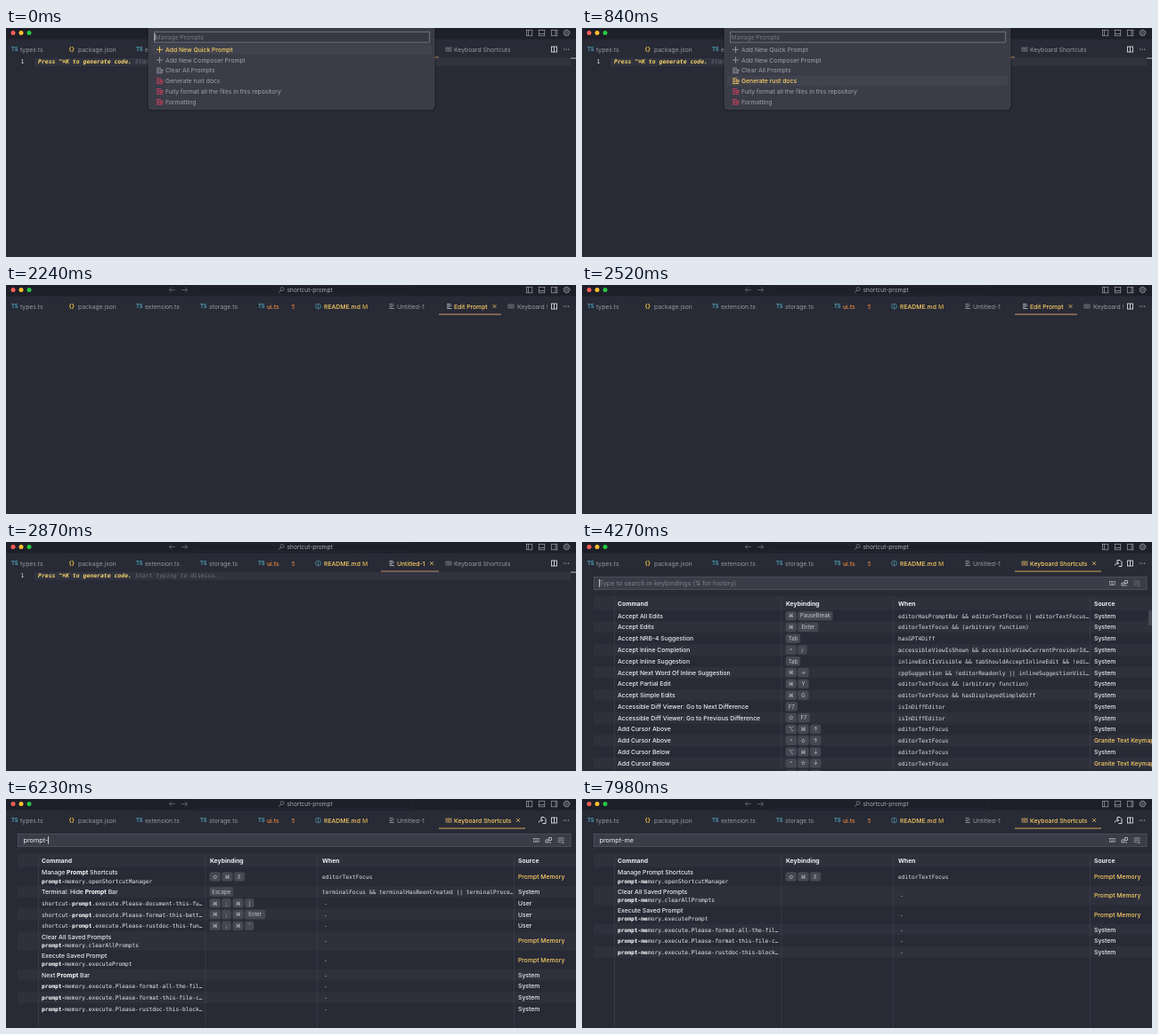
An HTML page that plays this animation: 640x258 px, repeating every 8000 ms.

```html
<!DOCTYPE html>
<html lang="en">
<head>
<meta charset="utf-8">
<title>Prompt shortcuts</title>
<style>
html, body { margin: 0; width: 100%; height: 100%; overflow: hidden; background: #282a36; }
svg { display: block; width: 640px; height: 258px; }
text { font: 6.8px Inter, "DejaVu Sans", sans-serif; white-space: pre; }
.mono { font: 6.25px "DejaVu Sans Mono", monospace; }
.code { font: italic 6.46px "DejaVu Sans Mono", monospace; }
.input { font-size: 7.3px; }
.title { font-size: 6.6px; }
.badge { font-size: 5.8px; }
.key { font-size: 6px; text-anchor: middle; }
.mid { font-weight: 500; }
.bold { font-weight: 700; }
</style>
</head>
<body>
<svg id="stage" viewBox="0 0 640 258"></svg>
<script>
const LOOP = 8000;
const BG = '#282a36', DARK = '#1d1f29', GREY = '#9799a3', DIM = '#767882', ICON = '#a0a2ab',
  WHITE = '#eeeef2', YELLOW = '#fbcf65', ORANGE = '#ee8a3c', TEAL = '#4fa3b8', RED = '#d8405f';
const stage = document.getElementById('stage');

// Drawing helpers; text is centred vertically on y.
const esc = s => s.replace(/&/g, '&amp;').replace(/</g, '&lt;');
const text = (s, x, y, fill = GREY, cls = '') =>
  `<text x="${x}" y="${y + 2.5}" fill="${fill}" class="${cls}">${esc(s)}</text>`;
const rect = (x, y, w, h, fill, more = '') =>
  `<rect x="${x}" y="${y}" width="${w}" height="${h}" fill="${fill}" ${more}/>`;
const path = (d, color = GREY, w = .7) =>
  `<path d="${d}" fill="none" stroke="${color}" stroke-width="${w}"/>`;
const circle = (x, y, r, fill, more = '') =>
  `<circle cx="${x}" cy="${y}" r="${r}" fill="${fill}" ${more}/>`;

// Text whose *marked* parts are bold and bright.
const marked = (s, x, y, cls) => `<text x="${x}" y="${y + 2.5}" fill="${WHITE}" class="${cls}">` +
  s.split('*').map((p, i) => i % 2 ? `<tspan class="bold" fill="#fff">${p}</tspan>` : p).join('') + '</text>';

const lines = (x, y, c = GREY) =>
  path(`M${x} ${y - 2.6}h4M${x} ${y - .9}h5.5M${x} ${y + .8}h3.5M${x} ${y + 2.5}h5.5`, c, .8);
const cross = (x, y, c) => path(`M${x - 2} ${y - 2}l4 4m0-4l-4 4`, c);
const keyboard = (x, y, c = GREY) =>
  rect(x, y - 2, 6, 4, 'none', `stroke="${c}" stroke-width=".6"`) +
  path(`M${x + 1} ${y - .6}h4M${x + 1.5} ${y + .9}h3`, c, .6);
const panel = (x, d) =>
  rect(x - 3.2, 2.3, 6.5, 6.5, 'none', `stroke="${ICON}" stroke-width=".7"`) + path(d, ICON);
const tsTab = (x, name, fill) =>
  text('TS', x, 23.4, TEAL, 'badge bold') + text(name, x + 10, 24, fill, fill && 'mid');

function chrome() {
  return rect(0, 0, 640, 258, BG) + rect(0, 0, 640, 12.5, DARK) +
    circle(8, 5.5, 2.5, '#fe5f57') + circle(17, 5.5, 2.5, '#febc2e') + circle(26, 5.5, 2.5, '#28c840') +
    path('M190 5.5h-6.5M186 2.8l-2.7 2.7l2.7 2.7M197 5.5h6.5M201 2.8l2.7 2.7l-2.7 2.7', DIM) +
    rect(211, .5, 246, 10, 'none', 'rx="2" stroke="#292b36" stroke-width=".6"') +
    circle(310, 4.6, 2, 'none', `stroke="${GREY}" stroke-width=".6"`) + path('M308.5 6.2l-2.3 2.5') +
    text('shortcut-prompt', 315.5, 5, '#aaacb4', 'title') +
    panel(587.5, 'M586.5 2.3v6.5') + panel(601.5, 'M598.3 6.5h6.5') + panel(615.5, 'M617 2.3v6.5') +
    circle(629.5, 5.5, 3.4, 'none', `stroke="${ICON}" stroke-width=".9" stroke-dasharray="1.5 1.17"`) +
    circle(629.5, 5.5, 2.8, 'none', `stroke="${ICON}" stroke-width=".7"`) +
    circle(629.5, 5.5, 1, 'none', `stroke="${ICON}" stroke-width=".6"`);
}

function tabs(view) {
  const edit = view === 'edit', keys = view === 'keys', untitled = view === 'untitled';
  const kx = edit ? 564 : 494, kc = keys ? YELLOW : GREY;
  const [ux, uw] = untitled ? [421, 65] : edit ? [486, 70] : [486, 97];
  return tsTab(6, 'types.ts') + text('{}', 70.5, 23.6, '#e0b73f', 'bold') + text('package.json', 81, 24) +
    tsTab(146, 'extension.ts') + tsTab(218, 'storage.ts') + tsTab(283, 'ui.ts', ORANGE) +
    text('5', 320.5, 24, ORANGE) +
    circle(350.5, 24, 2.9, 'none', `stroke="${TEAL}" stroke-width=".7"`) + path('M350.5 22v.8m0 .8v2.4', TEAL, .8) +
    text('README.md', 357, 24, YELLOW, 'mid') + text('M', 400, 24, '#d6ad55', 'mid') +
    lines(430.5, 24, untitled ? '#c4c5cc' : GREY) +
    text('Untitled-1', 439, 24, untitled ? YELLOW : GREY, untitled ? 'mid' : '') +
    (untitled ? cross(478, 24, YELLOW) : '') +
    (edit ? lines(495, 24, '#c4c5cc') + text('Edit Prompt', 503, 24, YELLOW, 'mid') + cross(548.5, 24, YELLOW) : '') +
    keyboard(kx, 24, kc) + text('Keyboard Shortcuts', kx + (edit ? 10 : 9), 24, kc, keys ? 'mid' : '') +
    (keys ? cross(575, 24, YELLOW) : '') +
    rect(608, 13, 32, 20, BG) +
    rect(ux, 32.6, uw, .9, keys ? '#e2b95c' : '#e0a878') +
    (keys ? path('M601 23v-2.500h3l2 2v5h-3.500M598.500 26.500c0-2 1-2.500 4-2.500m-1.500-1.500l1.500 1.500l-1.500 1.500', WHITE, .9) : '') +
    rect(612.5, 21, 6, 6, 'none', `stroke="${WHITE}" stroke-width=".8"`) + path('M615.5 21v6', WHITE, .8) +
    [626.5, 629, 631.5].map(x => circle(x, 24, .55, WHITE)).join('');
}

function untitledEditor() {
  return rect(32, 33.8, 602, 9, '#31333f') + rect(634, 33.6, 6, .9, '#c4c5cc') +
    text('1', 16.5, 37.6, WHITE, 'mono') +
    text('Press ^⌘K to generate code.', 36, 37.4, '#f8d568', 'code bold') +
    text('Start typing to dismiss.', 145, 37.4, '#6d6f7a', 'code');
}

const ITEMS = ['Add New Quick Prompt', 'Add New Composer Prompt', 'Clear All Prompts',
  'Generate rust docs', 'Fully format all the files in this repository', 'Formatting'];

function palette(t) {
  const sel = [420, 630, 770].filter(s => t >= s).length;
  const icon = (i, y, c) => i < 2
    ? path(`M172.5 ${y - 3.5}v7m-3.5-3.5h7`, c, .9)
    : path(`M169 ${y - 2.8}h5M169 ${y - .9}h3M169 ${y + 1}h3M169 ${y + 2.9}h7M173 ${y - .9}h3v2h-3z`, c, .9);
  return rect(158, -6, 325, 99.5, '#000', 'rx="5" opacity=".18"') +
    rect(160, -6, 321, 97.7, '#3a3c48', 'rx="4" stroke="#454752" stroke-width=".6"') +
    rect(166.5, 4.3, 309, 11.8, '#363843', 'stroke="#858791" stroke-width=".7"') +
    text('Manage Prompts', 167.5, 10.4, '#777983') +
    (t % 1000 < 500 ? rect(166.7, 6.3, .8, 7.8, WHITE) : '') +
    ITEMS.map((name, i) => {
      const y = 24.3 + i * 11.78, on = i === sel;
      return (on ? rect(163, y - 5.8, 315, 11.6, '#40424d', 'rx="1.5"') : '') +
        icon(i, y, on ? YELLOW : i < 3 ? GREY : RED) +
        text(name, 179, y, on ? YELLOW : '#a0a2aa', on ? 'mid' : '');
    }).join('');
}

// Rows: title, id, keys, when, source
const SYS = 'System', MEM = 'Prompt Memory', ADDON = 'Granite Text Keymap', FOCUS = 'editorTextFocus';
const cmd = (name, keys, when, src = SYS) => [name, '', keys, when, src];
const id = (name, keys = '', src = SYS) => ['', name, keys, '', src];
const ALL = [
  cmd('Accept All Edits', '⌘ PauseBreak', 'editorHasPromptBar && editorTextFocus || editorTextFocus…'),
  cmd('Accept Edits', '⌘ Enter', FOCUS + ' && (arbitrary function)'),
  cmd('Accept NRB-4 Suggestion', 'Tab', 'hasGPT4Diff'),
  cmd('Accept Inline Completion', '^ /', 'accessibleViewIsShown && accessibleViewCurrentProviderId…'),
  cmd('Accept Inline Suggestion', 'Tab', 'inlineEditIsVisible && tabShouldAcceptInlineEdit && !edi…'),
  cmd('Accept Next Word Of Inline Suggestion', '⌘ →', 'cppSuggestion && !editorReadonly || inlineSuggestionVisi…'),
  cmd('Accept Partial Edit', '⌘ Y', FOCUS + ' && (arbitrary function)'),
  cmd('Accept Simple Edits', '⌘ G', FOCUS + ' && hasDisplayedSimpleDiff'),
  cmd('Accessible Diff Viewer: Go to Next Difference', 'F7', 'isInDiffEditor'),
  cmd('Accessible Diff Viewer: Go to Previous Difference', '⇧ F7', 'isInDiffEditor'),
  cmd('Add Cursor Above', '⌥ ⌘ ↑', FOCUS),
  cmd('Add Cursor Above', '^ ⇧ ↑', FOCUS, ADDON),
  cmd('Add Cursor Below', '⌥ ⌘ ↓', FOCUS),
  cmd('Add Cursor Below', '^ ⇧ ↓', FOCUS, ADDON),
  cmd('Add Cursors to Line Ends', '⇧ ⌥ I', FOCUS),
];
const manage = (title, hit) => [title, hit + '.openShortcutManager', '⇧ ⌘ E', FOCUS, MEM];
const saved = hit => [
  ['Clear All Saved Prompts', hit + '.clearAllPrompts', '', '', MEM],
  ['Execute Saved Prompt', hit + '.executePrompt', '', '', MEM],
];
const runs = hit => ['format-all-the-fil…', 'format-this-file-c…', 'rustdoc-this-block…']
  .map(s => id(`${hit}.execute.Please-${s}`));
const HIT1 = '*prompt-*memory', HIT2 = '*prompt-me*mory';
const PROMPT = [
  manage('Manage *Prompt* Shortcuts', HIT1),
  cmd('Terminal: Hide *Prompt* Bar', 'Escape', 'terminalFocus && terminalHasBeenCreated || terminalProce…'),
  id('shortcut-*prompt*.execute.Please-document-this-fu…', '⌘ ; , ⌘ ]', 'User'),
  id('shortcut-*prompt*.execute.Please-format-this-bett…', '⌘ ; , ⌘ Enter', 'User'),
  id('shortcut-*prompt*.execute.Please-rustdoc-this-fun…', "⌘ ; , ⌘ '", 'User'),
  ...saved(HIT1), cmd('Next *Prompt* Bar', '', ''), ...runs(HIT1),
];
const MEMORY = [manage('Manage Prompt Shortcuts', HIT2), ...saved(HIT2), ...runs(HIT2)];

function keycaps(keys, y) {
  let x = 229;
  return keys.split(' ').filter(Boolean).map(k => {
    if (k === ',') { x += .5; return ''; }
    const w = ";]'/".includes(k) ? 9.5 : Math.max(11.5, 6 + 3.25 * k.length), left = x;
    x += w + 2.2;
    return rect(left, y - 4.8, w, 9.6, '#454752', 'rx="1.6" stroke="#50525d" stroke-width=".5"') +
      text(k, left + w / 2, y - .2, '#c6c7ce', 'key');
  }).join('');
}

function table(rows) {
  let top = 76.8, out = rect(13, 61.5, 627, 15.3, '#2e303c');
  ['Command', 'Keybinding', 'When', 'Source'].forEach((h, i) =>
    out += text(h, [40, 229, 355, 575][i], 69.1, WHITE, 'bold'));
  rows.forEach(([title, name, keys, when, src], i) => {
    const h = title && name ? 21.3 : 12.77, y = top + h / 2, gap = title && name ? 4.6 : 0;
    if (i % 2) out += rect(13, top, 627, h, '#2e303c');
    if (title) out += marked(title, 40, y - gap, 'mid');
    if (name) out += marked(name, 40, y + gap, 'mono');
    out += keycaps(keys, y) + text(when || '-', when ? 355 : 357, y, '#e2e3e8', 'mono') +
      text(src, 575, y, src === MEM || src === ADDON ? YELLOW : WHITE, 'mid');
    top += h;
  });
  if (top > 258) out += rect(636, 77, 4, 17, '#464853');
  return out + path('M36.5 61.5V258M224 61.5V258M349.5 61.5V258M570.5 61.5V258', '#41434e', .6);
}

const QUERY = 'prompt-me', OPEN = 4060;
const TYPED = [5110, 5250, 5390, 5530, 5670, 5740, 5880, 6300, 6440];

function shortcuts(t) {
  const n = TYPED.filter(s => t >= s).length;
  const last = n ? TYPED[n - 1] : OPEN;
  const caret = (t - last) % 1000 < 500;
  return rect(13.5, 39.3, 620.5, 14.4, '#3a3c48', 'stroke="#575964" stroke-width=".7"') +
    (n ? '' : text('Type to search in keybindings (⇅ for history)', 19.5, 46.3, '#7d7f89', 'input')) +
    `<text id="query" x="19.5" y="48.7" fill="${WHITE}" class="input">${QUERY.slice(0, n)}</text>` +
    (caret ? rect(19.2, 42, .8, 8.8, WHITE, 'id="caret"') : '') +
    keyboard(592.5, 46.6, '#b9bac2') +
    path('M606 46h3v3h-3zM610 49h2M609.5 43.5h3v3h-3z', '#b9bac2', .9) +
    path('M619.5 44h7M619.5 46.2h7M619.5 48.4h3.5M624 47.7l2.5 2.5m0-2.5l-2.5 2.5', n ? '#b9bac2' : DIM) +
    table(t < 6090 ? ALL : t < 6700 ? PROMPT : MEMORY);
}

function scene(t) {
  const view = t >= OPEN ? 'keys' : t >= 2030 && t < 2800 ? 'edit' : 'untitled';
  return chrome() + tabs(view) +
    (view === 'keys' ? shortcuts(t) : view === 'untitled' ? untitledEditor() : '') +
    (t < 1540 ? palette(t) : '');
}

let shown = '';
function draw(now) {
  const next = scene(now % LOOP);
  if (next !== shown) {
    stage.innerHTML = shown = next;
    const caret = document.getElementById('caret');
    if (caret) caret.setAttribute('x', 19.3 + document.getElementById('query').getComputedTextLength());
  }
  requestAnimationFrame(draw);
}
draw(performance.now());
</script>
</body>
</html>
```
